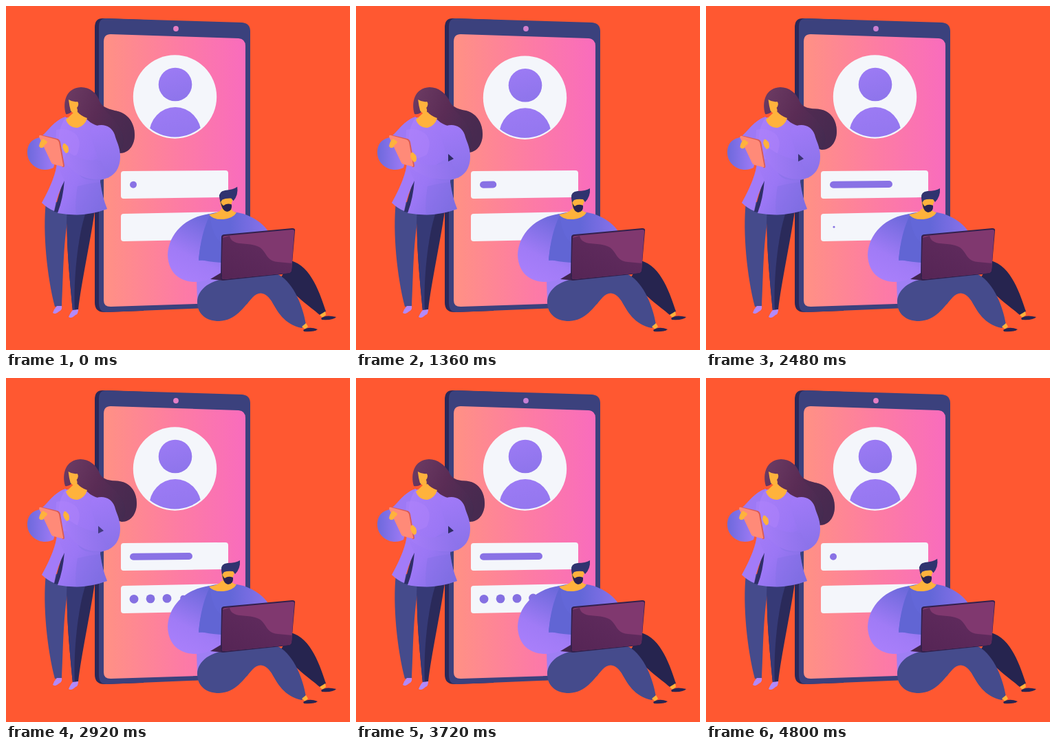
Recreate the animation shown at these times as an HTML page. Size 500 px wide and 500 px high, loop 4840 ms.

```html
<!DOCTYPE html>
<html lang="en">
<head>
<meta charset="utf-8">
<title>Sign in</title>
<style>
html, body { margin: 0; width: 100%; height: 100%; overflow: hidden; background: #ff5831; }
svg { display: block; width: 100vw; height: 100vh; }
</style>
</head>
<body>
<svg viewBox="0 0 500 500">
  <defs>
    <linearGradient id="screen"><stop offset="0" stop-color="#ff9184"/><stop offset=".5" stop-color="#fd7da2"/><stop offset="1" stop-color="#f96cbd"/></linearGradient>
    <linearGradient id="violet" x1="0" y1="0" x2=".3" y2="1"><stop offset="0" stop-color="#9d7bf5"/><stop offset="1" stop-color="#8f75ec"/></linearGradient>
    <linearGradient id="hairFill" x1="0" x2="1" y1=".2" y2=".6"><stop offset="0" stop-color="#6b3a62"/><stop offset=".45" stop-color="#5a2c55"/><stop offset="1" stop-color="#422b50"/></linearGradient>
    <linearGradient id="top" x1="0" y1="0" x2=".9" y2="1"><stop offset="0" stop-color="#aa7ff9"/><stop offset=".55" stop-color="#9b77f5"/><stop offset="1" stop-color="#7d6de0"/></linearGradient>
    <linearGradient id="cuff"><stop offset="0" stop-color="#6d69dc"/><stop offset=".8" stop-color="#a67df9"/></linearGradient>
    <linearGradient id="sleeve" x1=".3" y1="0" x2=".6" y2="1"><stop offset="0" stop-color="#a27af9"/><stop offset="1" stop-color="#8a72e9"/></linearGradient>
    <linearGradient id="forearm"><stop offset="0" stop-color="#a47cf8"/><stop offset="1" stop-color="#8c72ea"/></linearGradient>
    <linearGradient id="bigArm" x1=".75" y1="0" x2=".35" y2="1"><stop offset=".05" stop-color="#6c69db"/><stop offset=".65" stop-color="#a07bf6"/><stop offset="1" stop-color="#a97ffb"/></linearGradient>
    <linearGradient id="chest" x1="0" x2="1"><stop offset=".45" stop-color="#6367d8"/><stop offset="1" stop-color="#8c72eb"/></linearGradient>
    <linearGradient id="wave" x1="1" y1="0" x2="0" y2="1"><stop offset="0" stop-color="#642d60"/><stop offset="1" stop-color="#552555"/></linearGradient>
    <clipPath id="disc"><circle cx="245.5" cy="132" r="58.5"/></clipPath>
  </defs>
  <rect width="500" height="500" fill="#ff5831"/>

  <!-- phone -->
  <path d="M142 18Q129 17 129 31V431Q129 445 143 445L200 443V20Z" fill="#2a2858"/>
  <path d="M145 18L343 24Q355 25 355 37V418Q355 436 340 437L146 445Q135 445 135 432V30Q135 18 145 18Z" fill="#3b417d"/>
  <path d="M142 52Q142 41 152 41L338 47Q348 48 348 58V420Q348 431 338 431L152 437Q142 437 142 428Z" fill="url(#screen)"/>
  <circle id="lens" cx="247" cy="33" r="3.9"/>
  <g id="avatar">
    <circle cx="245.5" cy="132" r="60.7" fill="#f4f6fb"/>
    <circle cx="246" cy="114" r="24.3" fill="url(#violet)"/>
    <ellipse cx="246" cy="187" rx="38" ry="40" clip-path="url(#disc)" fill="url(#violet)"/>
  </g>
  <g fill="#f4f6fb">
    <path d="M171 240L319 239Q323 239 323 243V274Q323 278 319 278L171 280Q167 280 167 276V244Q167 240 171 240Z"/>
    <path d="M171 302L319 299Q323 299 323 303V335Q323 339 319 339L171 342Q167 342 167 338V306Q167 302 171 302Z"/>
  </g>
  <rect id="bar" x="180" y="254.7" height="10" rx="5" fill="#8972e5" transform="rotate(-.5 180 260)"/>
  <g id="dots" fill="#8570e2"></g>

  <!-- standing figure -->
  <path d="M58 285C53 330 60 395 71 437L81 436C83 400 83 345 90 310L94 285Z" fill="#454b8c"/>
  <path d="M89 298C87 345 93 400 97 443L105 441C110 400 122 345 129 298Z" fill="#2a2a5a"/>
  <path d="M89 298C87 345 93 400 97 443L100 442C98 400 104 335 116 300Z" fill="#363a77"/>
  <g fill="#b289fb">
    <path d="M68 446Q70 440 74 436L81 436Q82 442 77 444Q72 449 68 446Z"/>
    <path d="M91 452Q94 445 97 442L105 441Q105 448 101 449Q95 455 91 452Z"/>
  </g>
  <path d="M84 250L70 299L78 300L92 250Z" fill="#2f2f68"/>
  <path d="M74 228Q72 250 52 286Q60 294 70 298Q74 274 86 252L84 228Z" fill="#a27bf8"/>
  <path d="M86 162C74 172 72 195 74 225Q78 242 85 253Q83 280 75 301Q112 308 147 295Q140 278 137 256L140 185Q136 168 118 163Z" fill="url(#top)"/>
  <path d="M137 256Q118 258 104 262Q100 285 102 304Q126 303 147 295Q140 278 137 256Z" fill="#7f6ee3" opacity=".35"/>
  <path d="M87 161C70 166 62 181 51 190C47 192 44 192 41 194C29 200 28 219 37 229C46 239 59 240 69 235L78 200Q73 180 87 161Z" fill="url(#cuff)"/>
  <path d="M87 161C71 166 62 181 51 190L62 205L78 205Q73 182 87 161Z" fill="#9d79f5"/>
  <path d="M73 180Q90 176 102 187Q111 198 103 216Q92 222 76 225Q71 200 73 180Z" fill="#b084fa" opacity=".45"/>
  <path id="hair" fill="url(#hairFill)"/>
  <path id="curl" fill="#4d2a50" opacity=".5"/>
  <path d="M124 178C136 169 153 172 158 187C160 196 166 204 166 219C166 236 158 247 144 251C126 257 106 252 104 240Q122 226 134 221Q123 198 124 178Z" fill="url(#sleeve)"/>
  <path id="arm" fill="url(#forearm)"/>
  <path id="gap" d="M134 215L142 222L134 226Z" fill="#2f2c63"/>
  <g id="tablet">
    <path d="M50 187L75 193Q78 194 79 198L85 232Q85 235 82 234Z" fill="#d95b55"/>
    <path d="M48 190Q48 187 51 188L73 194Q76 195 77 198L83 231Q84 234 81 233L69 230Q66 229 65 226Z" fill="#ff8a78"/>
    <path d="M48 204Q49 196 54 193L60 197Q60 200 56 202Q55 207 50 206Z" fill="#ffb23c"/>
  </g>
  <path id="hand" d="M-4 -6Q-3 -8 -1 -7L3 -3Q5 2 3 6L0 7Q-4 3 -5 -2Z" fill="#ffb23c"/>
  <path d="M87 165Q91 177 104 177Q115 174 118 163Q109 160 104 154L97 156Q92 161 87 165Z" fill="#ffb23c"/>
  <path id="face" d="M91 136Q97 140 104 139Q107 143 103 148Q105 152 103 157Q97 157 94 152Q92 145 91 136Z" fill="#ffb23c"/>

  <!-- sitting figure -->
  <path d="M414 370C444 378 457 420 465 444L456 449C440 435 420 424 400 394Z" fill="#26244f"/>
  <path d="M456 449L464 444L465 449L460 453Z" fill="#ffb23c"/>
  <path d="M458 454Q464 448 480 452Q476 457 459 456Z" fill="#282552"/>
  <path d="M292 303Q320 295 345 302Q372 311 384 332L330 400L278 432V350Z" fill="url(#chest)"/>
  <path d="M277 395L312 392L300 420L278 432Z" fill="#9f7ff4"/>
  <path d="M278 430C278 411 300 395 330 396L393 389C415 398 431 432 436 463L430 468C404 463 394 443 386 429C376 414 366 415 358 424C345 438 334 457 310 458C291 458 278 448 278 430Z" fill="#454b8c"/>
  <path d="M430 466L436 461L439 466L435 470Z" fill="#ffb23c"/>
  <path d="M432 471Q440 465 453 470Q448 474 433 473Z" fill="#282552"/>
  <path d="M297 302C261 306 236 331 235 362C236 389 254 402 278 401C294 399 304 395 313 388V373Q302 368 280 370Q283 330 297 302Z" fill="url(#bigArm)"/>
  <path d="M297 302Q283 335 280 368Q294 372 313 373V345Q297 330 297 302Z" fill="#6165d4"/>
  <path d="M297 397L312 388L316 399Z" fill="#40244f"/>
  <path d="M313 336Q313 332 318 332L416 323Q421 323 420 327L415 385Q414 389 410 389L316 399Q311 399 312 394Z" fill="#33204c"/>
  <path d="M315 337Q315 334 319 334L416 325Q420 325 419 329L415 384Q414 388 410 388L317 397Q313 397 314 393Z" fill="#80386f"/>
  <path d="M315 337L325 334C328 348 345 344 358 347C382 351 373 370 395 372L416 374L415 384Q414 388 410 388L317 397Q313 397 314 393Z" fill="url(#wave)"/>
  <path d="M295 303Q301 311 316 310Q331 308 335 300Q328 299 327 293L313 295Q310 301 295 303Z" fill="#ffb23c"/>
  <g id="head">
    <path d="M314 279L331 279Q333 284 330 288L329 296H316Q312 287 314 279Z" fill="#ffb23c"/>
    <path d="M314 283Q315 289 318 291Q323 287 330 290Q331 299 323 300Q315 299 314 283Z" fill="#2a2350"/>
    <path d="M313 279Q312 270 322 269Q334 269 340 265Q341 277 333 285L330 281Q322 280 317 282L314 286Z" fill="#30336f"/>
  </g>
</svg>
<script>
const LOOP = 4840;
const TIMES = [0, 600, 1360, 2000, 2920, 3720, 4800, LOOP];
const POSE = {
  hairX: [0, -1, -3, 3, 3, 0, 0],
  hairY: [0, -1, -1, -5, -5, -5, 0],
  crown: [0, -1, -2, -1, -1, -3, 0],
  handX: [87, 84, 84, 88, 88, 84, 87],
  handY: [207, 220, 220, 201, 201, 221, 207],
  slide: [0, 0, 0, 3, 0, 0, 0],
  gap: [0, 1, 1, 1, .8, 1, 0],
  lens: [0, .1, .3, .85, .05, .5, 0],
  bob: [0, 0, 1.2, 0, 0, 0, 0],
  head: [1, 0, 0, 0, 0, 0, 1]
};
const el = id => document.getElementById(id);
const set = (id, name, value) => el(id).setAttribute(name, value);
const ease = p => { p = Math.min(1, Math.max(0, p)); return p * p * (3 - 2 * p); };
const ramp = (t, start, length) => ease((t - start) / length);

function pose(name, t) {
  const v = POSE[name];
  let i = 0;
  while (i < v.length - 1 && t >= TIMES[i + 1]) i++;
  const next = v[(i + 1) % v.length];
  return v[i] + (next - v[i]) * ramp(t, TIMES[i], TIMES[i + 1] - TIMES[i]);
}

const dots = [186, 210, 234, 257.5].map((x, i) => {
  const c = document.createElementNS("http://www.w3.org/2000/svg", "circle");
  c.setAttribute("cx", x);
  c.setAttribute("cy", 321.3 - i * .45);
  el("dots").append(c);
  return c;
});

function draw(t) {
  const p = name => pose(name, t);
  const move = (id, x, y, turn = "") => set(id, "transform", `translate(${x} ${y}) ${turn}`);

  const grow = ramp(t, 950, 1540) - ramp(t, 4050, 500);
  set("bar", "width", 10 + 81 * grow);
  dots.forEach((c, i) => c.setAttribute("r",
    6.4 * (ramp(t, 2400 + i * 120, 260) - ramp(t, 4150 - i * 80, 200))));

  const k = p("lens");
  set("lens", "fill", `rgb(${231 - 66 * k},${126 + 2 * k},${196 + 32 * k})`);
  move("avatar", 0, p("bob"));
  const tilt = p("head");
  move("head", -1.5 * tilt, -1 * tilt, `rotate(${-4 * tilt} 322 298)`);

  const s = p("slide"), hx = p("handX"), hy = p("handY");
  move("tablet", s, s * .8);
  move("hand", hx, hy);
  set("arm", "d", `M150 249C128 255 103 253 ${hx - 3} ${hy + 16}L${hx + 2} ${hy + 4}Q106 ${hy + 18} 138 225Z`);
  set("gap", "opacity", p("gap"));

  const x = p("hairX"), y = p("hairY"), c = p("crown");
  const pt = (a, b, w = 1) => `${a + x * w} ${b + y * w} `;
  const lobe = pt(158, 152, .5) + "C" + pt(178, 155) + pt(187, 171) + pt(187, 187) +
    "C" + pt(187, 203) + pt(178, 214) + pt(165, 214);
  set("hair", "d", `M${87 + c} 157C${82 + c} 140 ${87 + c} 119 ${109 + c} 118C${122 + c} 118 ${132 + c} 127 135 136C138 146 147 149 ` +
    lobe + "L155 205L148 178C138 174 128 175 119 166" +
    `C113 161 108 158 103 155L95 154Q91 158 ${87 + c} 157Z`);
  set("curl", "d", "M135 143C140 149 149 150 " + lobe + "C" + pt(182, 188, .8) + pt(160, 166, .5) + "135 143Z");
  move("face", c * .4, 0);
}

function frame(now) {
  draw(now % LOOP);
  requestAnimationFrame(frame);
}
draw(0);
requestAnimationFrame(frame);
</script>
</body>
</html>
```
